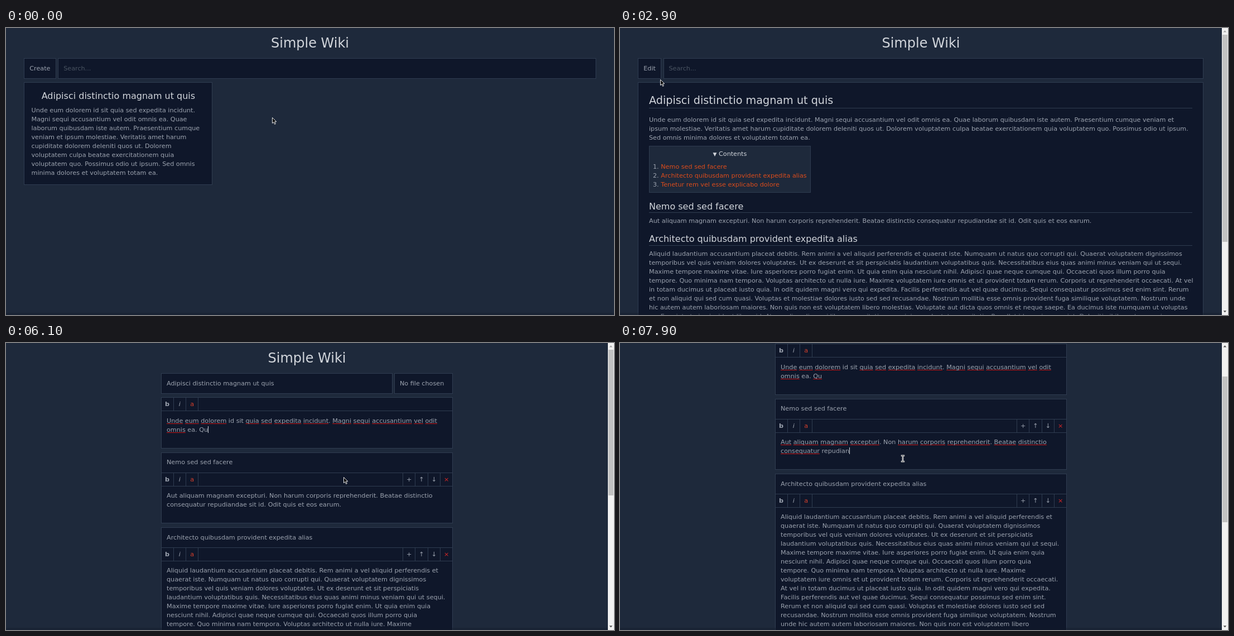
Write an HTML page that moves like this. It is 1090x514 px and loops after 8000 ms.

```html
<!DOCTYPE html>
<html lang="en">
<head>
<meta charset="utf-8">
<title>Simple Wiki</title>
<style>
  html, body { margin: 0; width: 100%; height: 100%; overflow: hidden; background: #1e293b; }
  #stage { position: relative; width: 1090px; height: 514px; overflow: hidden;
    font: 11.19px/16px "DejaVu Sans", sans-serif; color: #9ca3af; }
  #stage div { position: absolute; box-sizing: border-box; }
  .page { inset: 0; background: #1e293b; }
  .box { background: #0f172a; border: 1px solid #2f3c50; }
  .line { height: 1px; background: #2f3c50; }
  .text { white-space: pre; }
  .para { white-space: normal; }
  .light { color: #d1d5db; }
  .dim { color: #4b5563; }
  .link { color: #dc4c1c; }
  .cell { width: 22.5px; height: 23px; line-height: 23px; text-align: center; border: 0 solid #2f3c50; }
  u { text-decoration: underline 1.3px #c41414; text-underline-offset: 1px; text-decoration-skip-ink: none; }
  mark { background: #1967d2; color: #fff; }
  .caret { display: inline-block; width: 1px; height: 12px; margin-right: -1px; vertical-align: -2px; background: #d1d5db; }
  #strip { left: 0; right: 0; bottom: 0; height: 4px; background: rgba(15, 23, 42, .35); }
  #bubble { left: 0; top: 496.5px; height: 18px; padding: 0 4.5px 0 4px; border-radius: 0 3px 0 0;
    font-size: 10.4px; line-height: 17px; white-space: pre; background: #4c9070; color: #10231a; }
  #bar { left: 1079px; top: 0; width: 11px; height: 514px; background: #f1f1f1; }
  #thumb { left: 1px; width: 8.5px; background: #c1c1c1; }
  #bar svg { position: absolute; left: 0; top: 0; }
  #pointer { position: absolute; left: 0; top: 0; overflow: visible; }
</style>
</head>
<body>
<div id="stage"></div>
<script>
const INTRO = `Unde eum dolorem id sit quia sed expedita incidunt. Magni sequi accusantium vel odit
omnis ea. Quae laborum quibusdam iste autem. Praesentium cumque veniam et ipsum
molestiae. Veritatis amet harum cupiditate dolorem deleniti quos ut. Dolorem voluptatem
culpa beatae exercitationem quia voluptatem quo. Possimus odio ut ipsum. Sed omnis
minima dolores et voluptatem totam ea.`;
const NEMO = `Aut aliquam magnam excepturi. Non harum corporis reprehenderit. Beatae distinctio
consequatur repudiandae sit id. Odit quis et eos earum.`;
const ARCHITECTO = `Aliquid laudantium accusantium placeat debitis. Rem animi a vel aliquid perferendis et
quaerat iste. Numquam ut natus quo corrupti qui. Quaerat voluptatem dignissimos
temporibus vel quis veniam dolores voluptates. Ut ex deserunt et sit perspiciatis
laudantium voluptatibus quis. Necessitatibus eius quas animi minus veniam qui ut sequi.
Maxime tempore maxime vitae. Iure asperiores porro fugiat enim. Ut quia enim quia
nesciunt nihil. Adipisci quae neque cumque qui. Occaecati quos illum porro quia
tempore. Quo minima nam tempora. Voluptas architecto ut nulla iure. Maxime
voluptatem iure omnis et ut provident totam rerum. Corporis ut reprehenderit occaecati.
At vel in totam ducimus ut placeat iusto quia. In odit quidem magni vero qui expedita.
Facilis perferendis aut vel quae ducimus. Sequi consequatur possimus sed enim sint.
Rerum et non aliquid qui sed cum quasi. Voluptas et molestiae dolores iusto sed sed
recusandae. Nostrum mollitia esse omnis provident fuga similique voluptatem. Nostrum
unde hic autem autem laboriosam maiores. Non quis non est voluptatem libero
molestias. Voluptate aut dicta quos omnis et neque saepe. Ea ducimus iste numquam ut voluptas
ea. Eveniet ut eius incidunt libero id. Atque alias alias qui libero exercitationem minima
voluptatem veritatis. Repellat id quasi ea ex sint. Deleniti nihil amet quo qui.`;
const TITLE = "Adipisci distinctio magnam ut quis";
const HEADINGS = ["Nemo sed sed facere", "Architecto quibusdam provident expedita alias",
  "Tenetur rem vel esse explicabo dolore"];
const URL_TEXT = "127.0.0.1/adipisci-distinctio-magnam-ut-quis";

// Markup helpers; boxes take outer edges, text takes its left and the middle of its first line.
const box = (x, y, right, bottom, attrs = "") =>
  `<div class="box" ${attrs} style="left:${x}px;top:${y}px;width:${right - x}px;height:${bottom - y}px"></div>`;
const line = (x, y, right) => `<div class="line" style="left:${x}px;top:${y}px;width:${right - x}px"></div>`;
const text = (x, y, content, cls = "", size = 11.19, attrs = "") =>
  `<div class="text ${cls}" ${attrs} style="left:${x}px;top:${y - 7.5}px;font-size:${size}px">${content}</div>`;
const para = (x, y, width, content) =>
  `<div class="para" style="left:${x}px;top:${y - 7.5}px;width:${width}px">${content}</div>`;
const heading = width =>
  `<div class="light" style="left:0;top:19px;width:${width}px;text-align:center;font-size:24px">Simple Wiki</div>`;

const homePage = `<div class="page" id="home">${heading(1090)}
  ${box(32, 54, 90, 91)}${text(42.3, 72.5, "Create")}
  ${box(93, 54, 1058, 91)}${text(103.2, 72.5, "Search...", "dim")}
  ${box(32, 97, 369.5, 281)}${text(63.7, 121.5, TITLE, "light", 16)}
  <div id="underline" class="line" style="left:64px;top:131px;width:274px;background:#c3c8d0"></div>
  ${para(45.5, 147.3, 311, INTRO)}</div>`;

const viewPage = `<div class="page" id="view">${heading(1079)}
  ${box(32, 54, 74, 91, 'id="edit-button"')}${text(42.3, 72.5, "Edit")}
  ${box(77.5, 54, 1046, 91)}${text(87.5, 72.5, "Search...", "dim")}
  ${box(32, 97, 1046, 900)}
  ${text(52, 129, TITLE, "light", 19.2)}${line(52, 143, 1026)}
  ${para(52, 164.3, 976, INTRO)}
  <div class="box" style="left:52px;top:211px;width:290px;height:84px;background:#1e293b"></div>
  ${text(166.5, 225.8, '<span style="font-size:9px">▼</span> Contents', "light")}
  ${HEADINGS.map((h, i) => text(59, 248.3 + 16 * i, `${i + 1}. <span class="link">${h}</span>`)).join("")}
  ${text(52, 319, HEADINGS[0], "light", 16)}${line(52, 330, 1026)}
  ${para(52, 345.7, 976, NEMO)}
  ${text(52, 377, HEADINGS[1], "light", 16)}${line(52, 389, 1026)}
  ${para(52, 404.2, 976, ARCHITECTO)}</div>`;

const cell = (x, y, content, side) =>
  `<div class="cell" style="left:${x}px;top:${y}px;border-${side}-width:1px">${content}</div>`;
function toolbar(y, sectionTools) {
  const left = ["<b>b</b>", "<i>i</i>", '<span style="color:#d8402c">a</span>'];
  const right = ["+", "↑", "↓", '<span style="color:#dc2626">×</span>'];
  return left.map((c, i) => cell(278.3 + 22.3 * i, y, c, "right")).join("") +
    (sectionTools ? right.map((c, i) => cell(711 + 22.3 * i, y, c, "left")).join("") : "") +
    line(278, y + 23, 801);
}
const section = (y, title, body, bottom, id) => box(278, y, 801, bottom) + text(288, y + 18.3, title) +
  line(278, y + 36, 801) + toolbar(y + 37, true) + text(288, y + 77.6, body, "", 11.19, `id="${id}"`);

const editPage = `<div class="page" id="edit"><div id="scroller" style="inset:0">${heading(1079)}
  ${box(278, 54, 692.5, 91)}${text(288, 72.5, TITLE)}
  ${box(696, 54, 801, 91)}${text(706, 72.5, "No file chosen")}
  ${box(278, 97, 801, 221, 'id="intro-box"')}${toolbar(98, false)}
  ${text(288, 139.2, "", "", 11.19, 'id="intro"')}
  <div id="rest" style="inset:0">
    ${section(227.5, HEADINGS[0], NEMO, 355, "nemo")}
    ${section(361.7, HEADINGS[1], ARCHITECTO, 1000, "architecto")}
  </div></div></div>`;

const outlined = d => `<path d="${d}" fill="none" stroke="#fff" stroke-width="2.6"/>
  <path d="${d}" fill="none" stroke="#000" stroke-width=".6"/>`;
const POINTERS = {
  arrow: `<path d="M.5 .5V10.6L2.9 8.4L4.6 12.4L6.3 11.7L4.6 7.8H7.8Z" fill="#000" stroke="#fff" stroke-width=".9"/>`,
  hand: `<path d="M3.5 8V1.2Q4.5 0 5.4 1.2V5L10.8 6Q12 6.4 11.8 8L11 12.5H5.5L1 8.2Q1 6.5 3.5 8Z"
    fill="#000" stroke="#fff" stroke-width=".9"/>`,
  beam: outlined("M-3.2 -5.3H3.2M0 -5.3V5.3M-3.2 5.3H3.2"),
};

document.getElementById("stage").innerHTML = homePage + viewPage + editPage +
  `<div id="strip"></div><div id="bubble"></div>
  <div id="bar"><div id="thumb"></div><svg width="11" height="514">
    <path id="up" d="M2.6 7.5L5.4 4.3L8.2 7.5Z"/><path d="M2.6 506.3L5.4 509.5L8.2 506.3Z" fill="#505050"/>
  </svg></div><svg id="pointer" width="1" height="1"></svg>`;

const $ = id => document.getElementById(id);
const setHTML = (id, html) => {
  const el = $(id);
  if (el.shown !== html) el.innerHTML = el.shown = html;
};
const ramp = (t, from, to) => Math.min(1, Math.max(0, (t - from) / (to - from)));

// Red underlines below every word the spell checker does not know.
const KNOWN = new Set(["id", "sit", "ea", "non", "et", "ut"]);
const spell = (s, skipLast) => s.replace(/[a-z]+/gi, (word, at) =>
  KNOWN.has(word.toLowerCase()) || skipLast && at + word.length === s.length ? word : `<u>${word}</u>`);
const CARET = '<span class="caret"></span>';

function selected(s, from, to, check) {
  const mark = part => check ? spell(part) : part;
  return mark(s.slice(0, from)) + `<mark>${mark(s.slice(from, to))}</mark>` + mark(s.slice(to));
}

function introHTML(t) {
  const cut = INTRO.indexOf("ae laborum");
  if (t < 4600) return INTRO;
  if (t < 4700) return INTRO.slice(0, cut) + CARET + INTRO.slice(cut);
  if (t < 6100) return selected(INTRO, cut, t < 5500 ? INTRO.indexOf("ritatis") : INTRO.length, t >= 4800);
  const kept = INTRO.slice(0, cut);
  return t < 7500 ? spell(kept, true) + CARET : spell(kept);
}

function nemoHTML(t) {
  const cut = NEMO.indexOf("dae sit");
  if (t < 7500) return NEMO;
  if (t < 7700) return spell(NEMO);
  if (t < 7900) return selected(NEMO, cut, t < 7800 ? NEMO.indexOf("dit quis") : NEMO.length, true);
  return spell(NEMO.slice(0, cut), true) + CARET;
}

// Pointer path: time, x, y
const PATH = [[300, 477, 160], [1000, 250, 106], [1200, 214, 121], [1400, 211, 125], [2800, 211, 125],
  [2900, 72, 92], [3100, 60, 78], [3900, 60, 78], [4500, 330, 150], [4600, 362, 155], [4700, 366, 168],
  [5400, 366, 168], [5500, 793, 241], [6000, 793, 241], [6100, 605, 240], [6500, 576, 237.5],
  [6900, 562, 219], [7000, 562, 219], [7500, 411, 193], [7600, 411, 193], [7700, 480, 205],
  [7800, 590, 221], [7900, 507, 207]];

function pointerAt(t) {
  const next = PATH.findIndex(p => p[0] > t);
  if (next === 0) return PATH[0].slice(1);
  if (next < 0) return PATH[PATH.length - 1].slice(1);
  const [a, b] = [PATH[next - 1], PATH[next]];
  const u = ramp(t, a[0], b[0]);
  return [a[1] + (b[1] - a[1]) * u, a[2] + (b[2] - a[2]) * u];
}

function pointerKind(t) {
  if (t >= 1200 && t < 1800 || t >= 3100 && t < 3700) return "hand";
  return t >= 4500 && t < 6100 || t > 6100 ? "beam" : "arrow";
}

function render(t) {
  const page = t < 2000 ? "home" : t < 3900 ? "view" : "edit";
  for (const id of ["home", "view", "edit"]) $(id).style.display = id === page ? "block" : "none";

  $("underline").style.display = t >= 1200 ? "block" : "none";
  $("edit-button").style.background = t >= 3100 ? "#1e293b" : "";

  const shrunk = t >= 6100;
  const scroll = Math.round(95.6 * (1 - (1 - ramp(t, 6100, 6900)) ** 3));
  $("scroller").style.top = -scroll + "px";
  $("rest").style.top = (shrunk ? -32 : 0) + "px";
  $("intro-box").style.height = (shrunk ? 92 : 124) + "px";
  setHTML("intro", introHTML(t));
  setHTML("nemo", nemoHTML(t));

  $("bar").style.display = page === "home" ? "none" : "block";
  $("thumb").style.top = 12 + scroll * .505 + "px";
  $("thumb").style.height = (page === "view" ? 371 : shrunk ? 261 : 252) + "px";
  $("up").setAttribute("fill", scroll ? "#505050" : "#a3a3a3");

  setHTML("bubble", URL_TEXT + (t < 3000 ? "" : "/edit"));
  $("bubble").style.opacity = ramp(t, 1200, 1600) - ramp(t, 2000, 2400) + ramp(t, 3300, 3500) - ramp(t, 3900, 4300);

  const [x, y] = pointerAt(t);
  setHTML("pointer", POINTERS[pointerKind(t)]);
  $("pointer").style.transform = `translate(${x}px, ${y}px)`;
}

function tick(now) {
  render(Math.floor(now % 8000 / 100) * 100);
  requestAnimationFrame(tick);
}
render(0);
requestAnimationFrame(tick);
</script>
</body>
</html>
```
